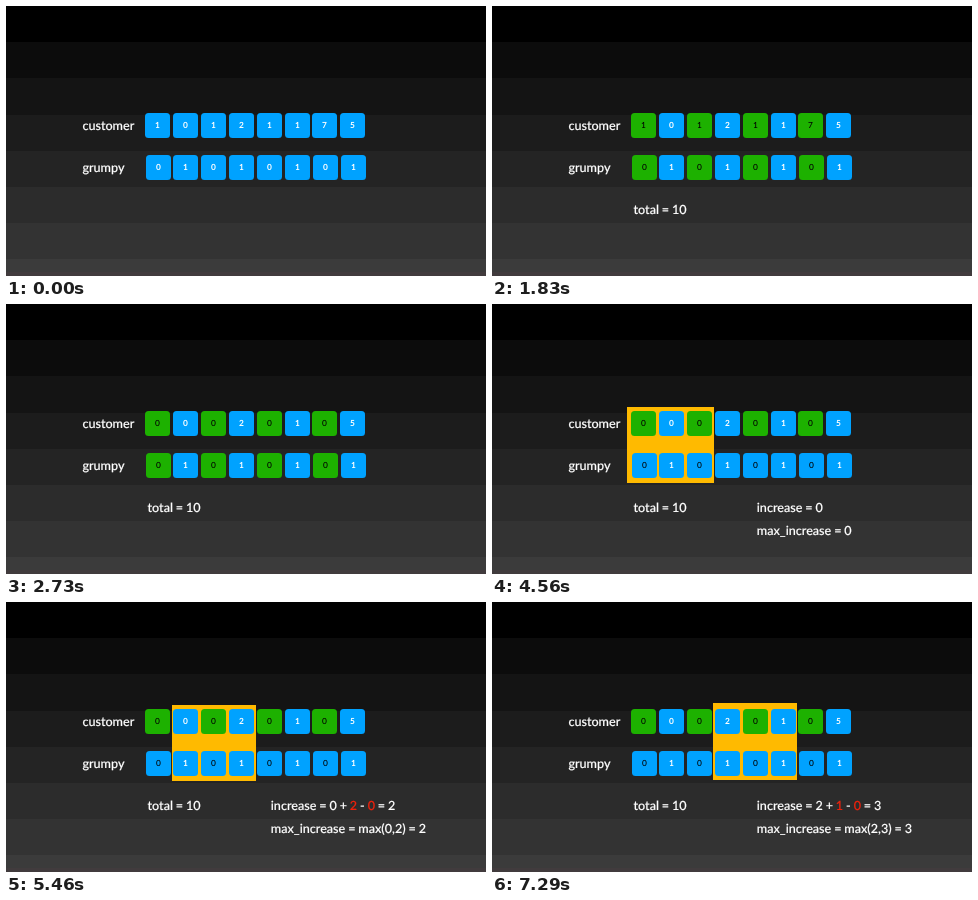
An HTML page that plays this animation: 480x270 px, repeating every 8 s.

```html
<!DOCTYPE html>
<html lang="en">
<head>
<meta charset="utf-8">
<title>Grumpy owner: sliding window</title>
<style>
  html, body { margin: 0; width: 100%; height: 100%; overflow: hidden; background: #000; }
  svg { display: block; width: 100vw; height: 100vh; color: #fff; }
  text {
    font: 500 12.6px Lato, "Open Sans", sans-serif; word-spacing: -0.3px;
    fill: currentColor; stroke: currentColor; stroke-width: 0.2px; text-rendering: geometricPrecision;
  }
  .cell { fill: #00a2ff; }
  .digit { font-size: 8.4px; font-weight: 700; text-anchor: middle; stroke: none; }
  .red { color: #ee220c; fill: currentColor; stroke: currentColor; }

  .anim { animation: 8s step-end infinite; }
  .served { animation-name: served; }
  .calm { animation-name: calm; }
  .dark { animation-name: dark; }
  .before { animation-name: before; }
  .after { animation-name: after; }
  .total { animation-name: total; }
  .window { fill: #ffba00; animation-name: window; }
  .step0 { animation-name: step0; }
  .step1 { animation-name: step1; }
  .step2 { animation-name: step2; }
  .step3 { animation-name: step3; }

  @keyframes served { 0% { fill: #00a2ff; } 11.625%, 100% { fill: #1db100; } }
  @keyframes calm { 0% { fill: #00a2ff; } 11.625% { fill: #1db100; } 45.375%, 100% { fill: #00a2ff; } }
  @keyframes dark { 0% { fill: #fff; font-weight: 700; } 11.625%, 100% { fill: #000; font-weight: 500; } }
  @keyframes before { 0% { opacity: 1; } 34.125%, 100% { opacity: 0; } }
  @keyframes after { 0% { opacity: 0; } 34.125%, 100% { opacity: 1; } }
  @keyframes total { 0% { opacity: 0; } 22.875%, 100% { opacity: 1; } }
  @keyframes window {
    0% { opacity: 0; x: 135px; y: 103px; width: 87px; height: 76px; }
    57% { opacity: 1; x: 135px; y: 103px; width: 87px; height: 76px; }
    68.25% { opacity: 1; x: 166px; y: 103px; width: 84px; height: 76px; }
    79.5% { opacity: 1; x: 193.5px; y: 102px; width: 84px; height: 76px; }
    91.125%, 100% { opacity: 1; x: 221px; y: 101px; width: 84px; height: 77px; }
  }
  @keyframes step0 { 0% { opacity: 0; } 57% { opacity: 1; } 68.25%, 100% { opacity: 0; } }
  @keyframes step1 { 0% { opacity: 0; } 68.25% { opacity: 1; } 79.5%, 100% { opacity: 0; } }
  @keyframes step2 { 0% { opacity: 0; } 79.5% { opacity: 1; } 91.125%, 100% { opacity: 0; } }
  @keyframes step3 { 0% { opacity: 0; } 91.125%, 100% { opacity: 1; } }
</style>
</head>
<body>
<svg id="stage" viewBox="0 0 480 270"></svg>
<script>
  const stage = document.getElementById('stage');
  const customer = [1, 0, 1, 2, 1, 1, 7, 5];
  const grumpy = [0, 1, 0, 1, 0, 1, 0, 1];
  const bands = ['#000', '#0c0c0c', '#141414', '#1c1c1c', '#242424', '#2c2c2c', '#333', '#3b3b3b'];
  const pitch = 27.9;

  const rect = (x, y, w, h, attrs) => `<rect x="${x}" y="${y}" width="${w}" height="${h}" ${attrs}/>`;
  const text = (x, y, body, cls = '') => `<text x="${x}" y="${y}" class="${cls}">${body}</text>`;
  const red = n => `<tspan class="red">${n}</tspan>`;

  function background() {
    const strips = bands.map((c, i) => rect(0, Math.round(i * 36.2), 480, 37, `fill="${c}"`));
    return strips.join('') + rect(0, 266, 480, 4, 'fill="#413b3d"');
  }

  function row(values, left, top, cellClass, zeroed) {
    return values.map((value, i) => {
      const x = Math.round(left + i * pitch);
      const happy = !grumpy[i];
      const digit = (n, cls) => text(x + 12.5, top + 15.2, n, 'digit ' + cls);
      const box = rect(x, top, 25, 25, `rx="3.5" class="cell ${happy ? 'anim ' + cellClass : ''}"`);
      if (!happy) return box + digit(value, '');
      const number = digit(value, 'anim dark');
      if (!zeroed) return box + number;
      return box + `<g class="anim before">${number}</g><g class="anim after">${digit(0, 'anim dark')}</g>`;
    }).join('');
  }

  function result(step, sum, best) {
    return `<g class="anim step${step}">` +
      text(264.8, 208, 'increase = ' + sum) +
      text(264.8, 231.2, 'max_increase = ' + best) + '</g>';
  }

  stage.innerHTML = background() +
    '<rect class="anim window"/>' +
    text(76.4, 123.7, 'customer') +
    text(76.4, 165.7, 'grumpy') +
    row(customer, 139, 107, 'served', true) +
    row(grumpy, 139.5, 149, 'calm', false) +
    text(141.5, 208, 'total = 10', 'anim total') +
    result(0, '0', '0') +
    result(1, `0 + ${red(2)} - ${red(0)} = 2`, 'max(0,2) = 2') +
    result(2, `2 + ${red(0)} - ${red(0)} = 2`, 'max(2,2) = 2') +
    result(3, `2 + ${red(1)} - ${red(0)} = 3`, 'max(2,3) = 3');
</script>
</body>
</html>
```
